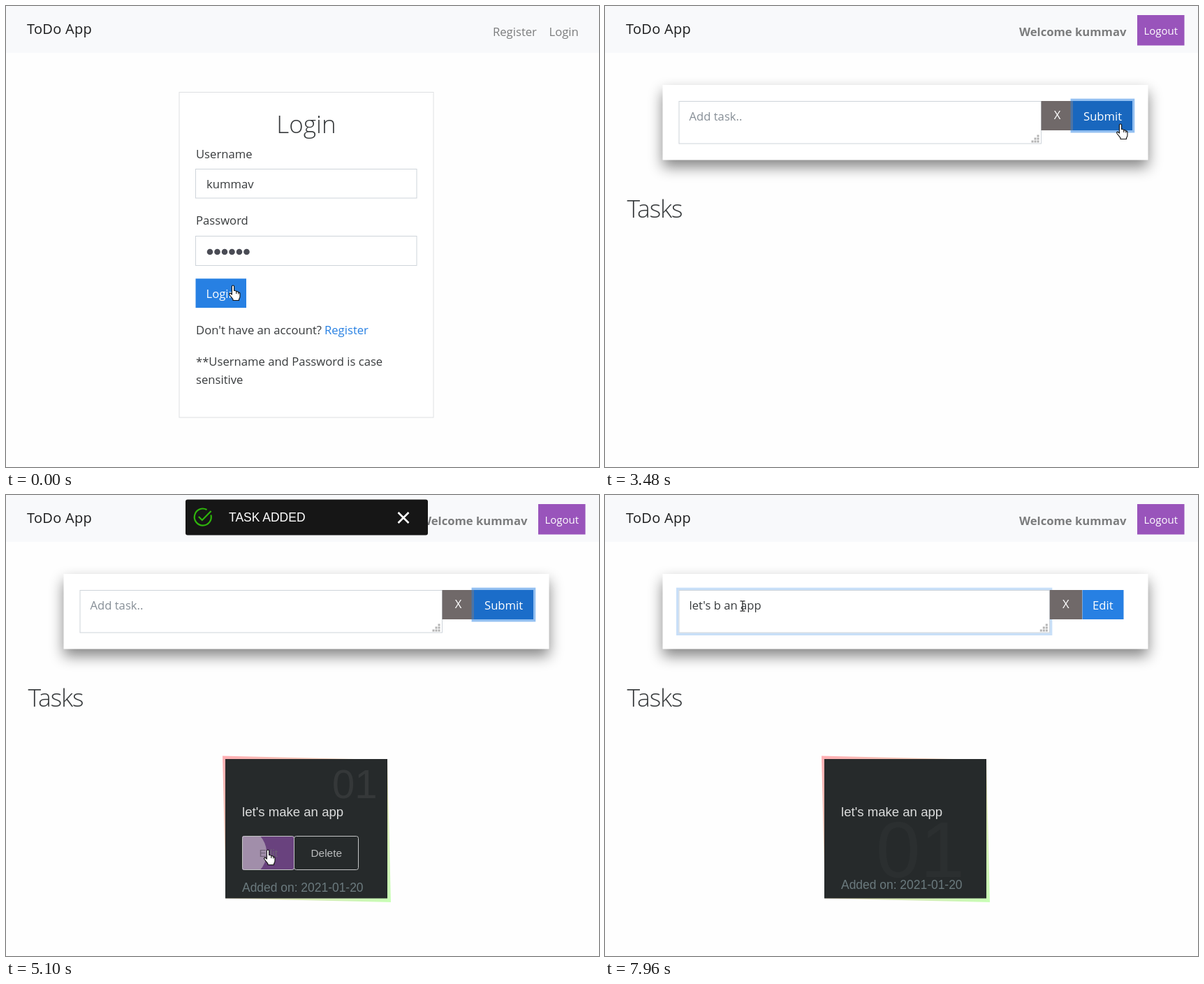
Animation, 849 px wide and 660 px high, one loop 8 s. Source, as an HTML page:

```html
<!DOCTYPE html>
<html lang="en">
<head>
<meta charset="utf-8">
<title>ToDo App</title>
<style>
  html, body { margin: 0; width: 100%; height: 100%; overflow: hidden; background: #fefefe; }
  svg { display: block; width: 849px; height: 660px; font: 16.65px "Open Sans", "Noto Sans", sans-serif; fill: #373a3c; }
  text { white-space: pre; }
  .light { font-weight: 300; }
  .muted { fill: #7b7c7d; }
  .white { fill: #fff; }
  .blue { fill: #2780e3; }
  .field { fill: #fff; stroke: #ced4da; }
  .glow { fill: none; stroke: #2780e3; stroke-width: 3.5; }
  .sans { font-family: "Liberation Sans", Arial, sans-serif; }
  #panel { fill: #fff; filter: drop-shadow(0 10px 10px rgba(0, 0, 0, .48)); }
  #placeholder { fill: #868e96; }
  .outline { fill: none; stroke: #c4c6c6; }
  #pointer path { stroke-linejoin: round; }
</style>
</head>
<body>
<svg viewBox="0 0 849 660">
  <defs>
    <linearGradient id="tint" x1="0" y1="0" x2="1" y2="1">
      <stop offset="0" stop-color="#ffaeb3"/><stop offset="1" stop-color="#c8ffb6"/>
    </linearGradient>
    <clipPath id="selectionClip"><rect class="selected" x="156" y="146" height="23"/></clipPath>
    <clipPath id="editClip"><rect x="338" y="488" width="74.5" height="49" rx="3"/></clipPath>
  </defs>

  <rect width="849" height="67" fill="#f8f9fb"/>
  <text x="30" y="40" font-size="20" letter-spacing=".3" fill="#1b1c1d">ToDo App</text>

  <g id="loginPage">
    <g class="muted"><text x="697" y="42.5">Register</text><text x="777.5" y="42.5">Login</text></g>
    <rect x="248" y="123.5" width="364" height="465.5" fill="#fff" stroke="#dee0e2"/>
    <text class="light" x="430" y="182" font-size="35" text-anchor="middle">Login</text>
    <text x="272" y="218">Username</text>
    <rect class="field" x="271.5" y="233.5" width="316.5" height="41.5"/>
    <text x="287" y="261">kummav</text>
    <text x="272" y="313">Password</text>
    <rect class="field" x="271.5" y="329.5" width="316.5" height="42"/>
    <path d="M292 352h54" stroke="#4a4c55" stroke-width="8.6" stroke-linecap="round" stroke-dasharray="0 10.5"/>
    <rect id="loginGlow" class="glow" x="269.8" y="388.5" width="76" height="45.3"/>
    <rect id="loginButton" x="271.5" y="390.3" width="72.5" height="41.8"/>
    <text class="white" x="286.5" y="417.5">Login</text>
    <text x="272" y="470">Don't have an account?</text>
    <text class="blue" x="456" y="470">Register</text>
    <text x="272" y="514.5">**Username and Password is case</text>
    <text x="272" y="541">sensitive</text>
  </g>

  <g id="taskPage">
    <text class="muted" x="593" y="42.5" font-weight="700">Welcome kummav</text>
    <rect x="762" y="13" width="67.5" height="43.5" fill="#9954bb"/>
    <text class="white" x="771.5" y="41" font-size="15">Logout</text>

    <rect id="panel" x="82.5" y="113" width="695" height="107.5"/>
    <rect id="areaGlow" class="glow" x="103.8" y="134.4" height="64.8" opacity=".25"/>
    <rect id="area" class="field" x="106" y="136.5" height="60.5"/>
    <text id="placeholder" x="120.5" y="163.5">Add task..</text>
    <text id="typed" x="120.5" y="163.5"></text>
    <rect class="selected" x="156" y="146" height="23" fill="#0078d7"/>
    <text class="white" x="120.5" y="163.5" clip-path="url(#selectionClip)">let's make an app</text>
    <path id="caret" d="M255.5 146.5v22.5" stroke="#222"/>
    <g id="controls">
      <path d="M618.5 184.5h3v3h-3zm0 4h3v3h-3zm-4 0h3v3h-3zm4 4h3v3h-3zm-4 0h3v3h-3zm-4 0h3v3h-3z" fill="#b4b4b4"/>
      <rect x="624.5" y="136" width="46.5" height="42" fill="#706969"/>
      <text class="white" x="647.5" y="162" text-anchor="middle">X</text>
    </g>
    <rect id="submitGlow" class="glow" x="668.3" y="134.4" width="88.2" height="45.3" opacity=".5"/>
    <rect id="submitButton" y="136" height="42"/>
    <text id="submitLabel" class="white" y="163.5"></text>
    <text class="light" x="31.5" y="303" font-size="35.5" letter-spacing="-1.2">Tasks</text>

    <g id="card" class="sans">
      <path d="M310 373.5L546 379L551 583L315 577.5Z" fill="url(#tint)"/>
      <rect x="314" y="378" width="232" height="199.5" fill="#262a2b"/>
      <text id="number" fill="#fff">01</text>
      <text x="338" y="459.5" font-size="18.6" fill="#dcdddd">let's make an app</text>
      <g id="cardButtons" font-size="15.4" fill="#bbbdbe">
        <g clip-path="url(#editClip)">
          <rect id="editFill" x="338" y="488" width="75" height="49" fill="#9954bb"/>
          <circle id="ripple" cx="337" cy="512.5" fill="#a18eaa"/>
        </g>
        <rect class="outline" x="338.5" y="488.5" width="74" height="48" rx="3"/>
        <rect class="outline" x="412.5" y="488.5" width="92" height="48" rx="3"/>
        <text id="editText" x="362.5" y="518">Edit</text>
        <text x="436.5" y="518">Delete</text>
      </g>
      <text id="added" x="338" font-size="17.45" fill="#6b7a7e">Added on: 2021-01-20</text>
    </g>

    <g id="toast" class="sans">
      <rect x="257" y="6.5" width="347" height="51" rx="3" fill="#161616"/>
      <path d="M293.4 28.5A12 12 0 1 1 287.5 21M275.8 31l5 5l12.8-13" fill="none" stroke="#2fb50c" stroke-width="2.2"/>
      <text class="white" x="319" y="38" font-size="17.5">TASK ADDED</text>
      <path d="M561.5 25l15 15m0-15l-15 15" stroke="#fff" stroke-width="2.6"/>
    </g>
  </g>

  <circle id="press" r="12.5" fill="#fff23c" opacity=".75"/>
  <g id="pointer">
    <path id="hand" fill="#fff" stroke="#111" stroke-width="1.1" d="M-1.6 12V1.6a1.6 1.6 0 0 1 3.2 0V7.5q3-.3 3.2 1.2q2.6-.3 3 1.2q2.2 0 2.2 2v4q0 2-1.5 4v1.6H0v-1.6l-5-6.4q-1-2 .8-2.4q1 0 2.6 2zM4.8 8.7v3.3M7.8 9.9v2.6"/>
    <path id="arrow" fill="#fff" stroke="#111" d="M0 0v16.5l3.8-3.6l2.6 6l2.6-1.1l-2.6-5.8h5.2z"/>
    <path id="beam" fill="none" stroke="#222" stroke-width="1.2" d="M-3.5-7.2h2.5l1 .8l1-.8h2.5M0-6.4V6.4M-3.5 7.2h2.5l1-.8l1 .8h2.5"/>
  </g>
</svg>
<script>
const DURATION = 8000;
const ui = {};
document.querySelectorAll("svg [id]").forEach(el => ui[el.id] = el);
const selected = document.querySelectorAll(".selected");

const ramp = (t, from, to) => Math.min(1, Math.max(0, (t - from) / (to - from)));
const mix = (a, b, k) => a + (b - a) * k;
const show = (el, on) => el.setAttribute("visibility", on ? "visible" : "hidden");
const set = (el, attrs) => { for (const name in attrs) el.setAttribute(name, attrs[name]); };
const shade = (from, to, k) => `rgb(${from.map((c, i) => Math.round(mix(c, to[i], k)))})`;

const BLUE = [39, 128, 227], HOVER = [27, 109, 201], ACTIVE = [25, 103, 190];

// time, x, y of the pointer's hot spot
const path = [
  [0, 325, 400], [70, 325, 400], [150, 317, 417], [300, 317, 417], [380, 317, 416], [550, 316, 415],
  [2400, 316, 415], [2479, 316, 413], [2480, 278, 155], [2600, 278, 155], [3250, 738, 169],
  [3790, 738, 169], [4020, 733, 172], [4500, 480, 440], [5000, 375, 508], [5490, 375, 508],
  [6200, 163, 162], [6400, 158, 160], [6560, 193, 160], [6720, 197, 159], [8000, 197, 159]
];

function pointerAt(t) {
  const i = path.findIndex(p => p[0] > t);
  const [t0, x0, y0] = path[i - 1], [t1, x1, y1] = path[i];
  const k = ramp(t, t0, t1), eased = k * k * (3 - 2 * k);
  return [mix(x0, x1, eased), mix(y0, y1, eased)];
}

function pointerKind(t, x, y) {
  if (t < 2090) return "hand";
  const inForm = y > 136 && y < 197;
  if (inForm && x < 624) return "beam";
  if (inForm && y < 178 && x < 755) return "hand";
  return t > 4700 && y > 488 && x < 505 ? "hand" : "arrow";
}

function drawLogin(t) {
  show(ui.loginPage, t < 2090);
  const hover = ramp(t, 10, 150), press = ramp(t, 680, 760) - ramp(t, 860, 1020);
  ui.loginButton.setAttribute("fill", press > 0 ? shade(HOVER, ACTIVE, press) : shade(BLUE, HOVER, hover));
  ui.loginGlow.setAttribute("opacity", .5 * ramp(t, 640, 850));
}

function drawForm(t, x) {
  const on = t >= 2090, editing = t >= 5330;
  const focused = t >= 2480 && t < 3330 || t >= 6370;
  const value = t >= 7730 ? "let's b an app" : editing || t >= 2480 && t < 3440 ? "let's make an app" : "";
  const width = editing ? 530.5 : 518.5;
  set(ui.area, { width, stroke: focused ? "#93c0f1" : "#ced4da" });
  set(ui.areaGlow, { width: width + 4.3 });
  show(ui.areaGlow, on && focused);
  ui.typed.textContent = value;
  show(ui.placeholder, on && !value);
  show(ui.caret, t >= 2480 && t < 2980);
  set(ui.controls, { transform: `translate(${editing ? 12.3 : 0} 0)` });

  const submitFocus = t >= 3330 && !editing;
  const hover = t < 3330 && x > 670 ? ramp(x, 670, 715) : 0;
  const fill = submitFocus ? shade(ACTIVE, HOVER, ramp(t, 3500, 3650)) : shade(BLUE, HOVER, hover);
  set(ui.submitButton, { x: editing ? 683.5 : 670, width: editing ? 59 : 85, fill });
  set(ui.submitLabel, { x: editing ? 698 : 685 });
  ui.submitLabel.textContent = editing ? "Edit" : "Submit";
  show(ui.submitGlow, submitFocus);

  const letters = t < 6400 || t >= 7730 ? 0 : Math.min(4, 1 + Math.floor((t - 6400) / 75));
  selected.forEach(el => el.setAttribute("width", [0, 15.5, 24.7, 32.5, 42.7][letters]));
}

function drawCard(t) {
  const hover = ramp(t, 4420, 4640) - ramp(t, 5550, 5780);
  const editHover = ramp(t, 4930, 5180) - ramp(t, 5490, 5640);
  show(ui.card, t >= 3560);
  set(ui.number, {
    x: mix(388, 467, hover), y: mix(547, 434, hover),
    "font-size": mix(114, 58, hover), opacity: mix(.022, .065, hover)
  });
  set(ui.added, { y: mix(563.5, 568, hover) });
  ui.cardButtons.setAttribute("opacity", hover);
  ui.editFill.setAttribute("opacity", .85 * Math.min(1, editHover));
  ui.ripple.setAttribute("r", Math.max(0, editHover) * 53);
  ui.editText.setAttribute("fill", shade([187, 189, 190], [74, 54, 84], editHover));
}

function render(t) {
  const [x, y] = pointerAt(t), kind = pointerKind(t, x, y);
  show(ui.taskPage, t >= 2090);
  drawLogin(t);
  drawForm(t, x);
  drawCard(t);
  ui.toast.setAttribute("opacity", ramp(t, 3740, 3950) - ramp(t, 6330, 6860));
  set(ui.press, { cx: x - .5, cy: y });
  show(ui.press, t >= 6380 && t < 7100);
  ui.pointer.setAttribute("transform", `translate(${x.toFixed(1)} ${y.toFixed(1)})`);
  for (const name of ["hand", "arrow", "beam"]) show(ui[name], name === kind);
}

function tick() {
  render(performance.now() % DURATION);
  requestAnimationFrame(tick);
}
tick();
</script>
</body>
</html>
```
